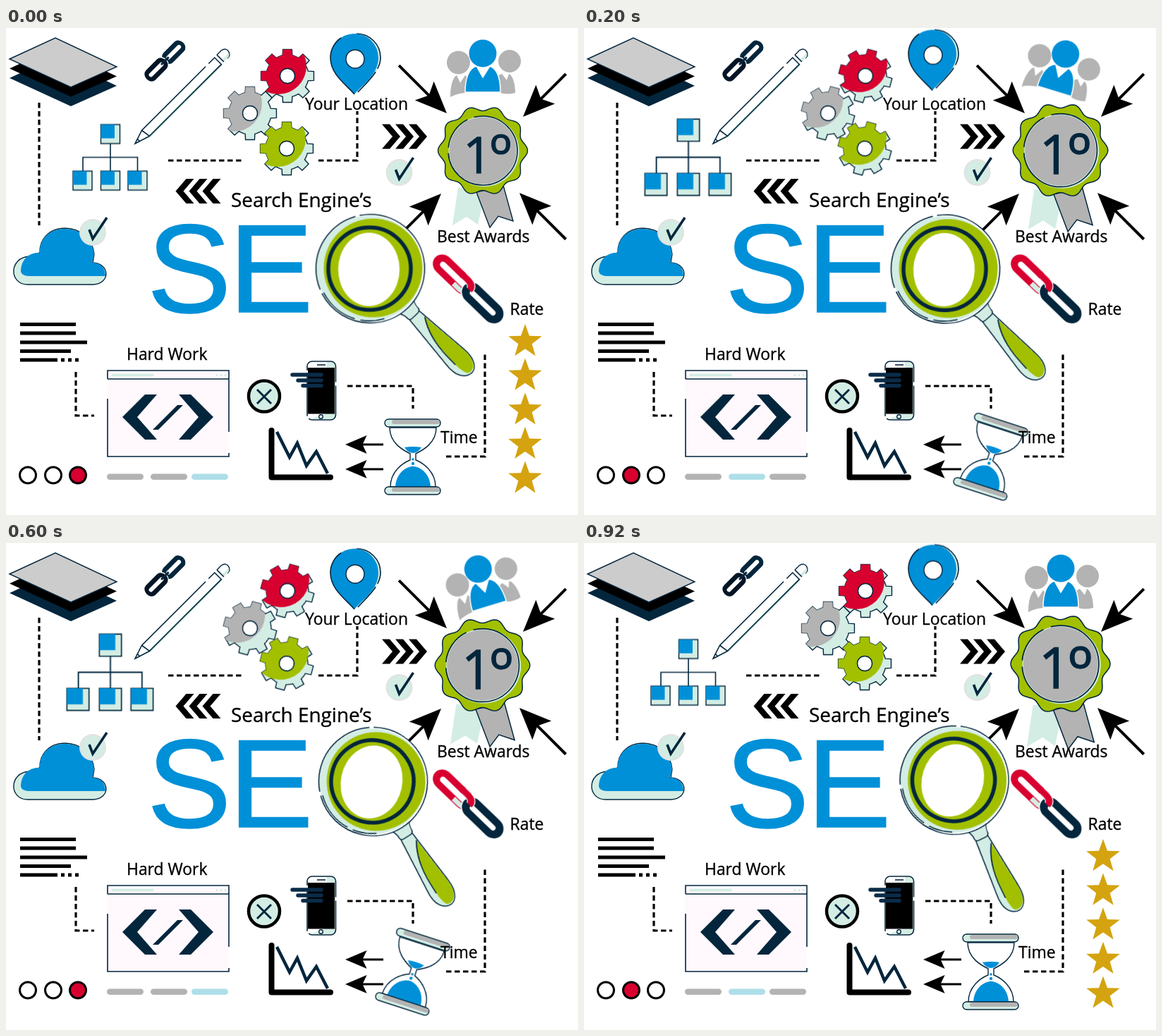
These frames come from a looping animation (811x691 px, 1000 ms). An HTML page:

```html
<!DOCTYPE html>
<html lang="en">
<head>
<meta charset="utf-8">
<title>SEO infographic</title>
<style>
  html, body { margin: 0; width: 100%; height: 100%; overflow: hidden; background: #fff; }
  svg { display: block; width: 100%; height: 100%; }
  .blue { fill: #0090d8; } .navy { fill: #03263d; } .mint { fill: #d3ede4; } .lime { fill: #a2c000; }
  .gray { fill: #b3b3b3; } .red { fill: #d8002f; } .white { fill: #fff; } .gold { fill: #d4a30f; }
  .line { fill: none; stroke: #03263d; stroke-width: 1.6; }
  .edge { stroke: #03263d; stroke-width: 1.4; }
  .dash { fill: none; stroke: #000; stroke-width: 3.2; stroke-dasharray: 7.5 4.5; }
  .label { font: 22.9px "Open Sans", "Noto Sans", sans-serif; stroke: #000; stroke-width: .35; }
  .big { font: 179px "Liberation Sans", Arial, sans-serif; stroke: #0090d8; stroke-width: 1.5; }
  .rank { font: 72px "Open Sans", "Noto Sans", sans-serif; stroke: #03263d; stroke-width: 1.2; }
</style>
</head>
<body>
<svg viewBox="0 0 811 691">
  <defs>
    <path id="sheet" d="M5 44L70 14L157 55L92 84Z"/>
    <path id="chevron" d="M0 0H11L26 17.5L11 35H0L15 17.5Z"/>
    <path id="head" d="M0 0L-45 -19L-36 0L-45 19Z"/>
    <path id="link" d="M-16 -8H16A8 8 0 0 1 16 8H-16A8 8 0 0 1 -16 -8Z"/>
    <g id="tick">
      <circle r="19" fill="#e2e2e2"/>
      <circle r="16.500" class="mint"/>
      <path d="M-5 -4L0 9L20 -21" fill="none" stroke="#03263d" stroke-width="3.600"/>
    </g>
    <g id="node">
      <path class="mint edge" d="M-13.5 -13.5H13.5V13.5H-13.5Z"/>
      <path class="blue" d="M-13.5 -13.5H6V6H-13.5Z"/>
    </g>
  </defs>

  <!-- paper stack -->
  <use href="#sheet" y="27" class="navy"/>
  <use href="#sheet" y="13.500"/>
  <use href="#sheet" fill="#ccc" class="edge"/>

  <!-- small chain -->
  <g transform="translate(225 47) rotate(-45)" fill="none" stroke="#03263d">
    <use href="#link" transform="translate(18 0) scale(.68 .78)" stroke-width="8.500"/>
    <use href="#link" transform="translate(-17 0) scale(.68 .78)" stroke="#fff" stroke-width="12"/>
    <use href="#link" transform="translate(-17 0) scale(.68 .78)" stroke="#031526" stroke-width="8.500"/>
    <path d="M-7 0H8" stroke-width="3"/>
  </g>

  <!-- pencil -->
  <g transform="translate(183 164) rotate(-45)">
    <path class="mint" d="M0 0L22 9H166V5H22Z"/>
    <path class="line" d="M0 0L20 -6.500H148M154 -6.500H166V8M0 0L22 7H166M20 -6.500L22 7M0 0L7 -2.300V2.300Z"/>
    <path class="white edge" d="M171 -7H180Q188 -5 186 2Q184 8 178 7"/>
    <path class="mint" d="M171 3H185Q183 7 178 7H171Z"/>
    <path class="line" d="M171 -7V7"/>
  </g>

  <g class="dash">
    <path d="M47 106V280"/>
    <path d="M230 188H338"/>
    <path d="M443 188H498V118"/>
    <path d="M99 488V550H125"/>
    <path d="M484 508H577V540"/>
    <path d="M624 608H679V459"/>
  </g>

  <!-- site tree -->
  <g id="tree">
    <path class="line" d="M0 -19V20M-39 20V0H38.500V20"/>
    <use href="#node" y="-33"/>
    <use href="#node" x="-39.500" y="33"/>
    <use href="#node" y="33"/>
    <use href="#node" x="38.500" y="33"/>
  </g>

  <g id="gears"></g>

  <!-- map pin -->
  <g id="pin">
    <path class="mint" d="M498 92C511 78 531 64 531 42A34 34 0 0 0 497 8Z"/>
    <path class="line" d="M497 8A34 34 0 0 1 531 42C531 60 514 75 499 91" stroke-dasharray="70 5 60"/>
    <path class="blue" d="M494 94C482 80 460 66 460 42A34 34 0 0 1 528 42C528 66 506 80 494 94Z"/>
    <path class="line" d="M494 94C482 80 460 66 460 42A34 34 0 0 1 475 14"/>
    <circle class="white edge" cx="495" cy="44" r="13"/>
  </g>
  <path id="pinTop" class="white" d="M450 0H540V26H450Z"/>

  <g id="chevrons"></g>
  <use href="#tick" x="557.500" y="205"/>

  <!-- cloud -->
  <path class="mint edge" d="M30 364C4 363 4 326 33 324Q40 320 48 319C47 300 61 284 83 284C106 284 123 300 125 321L123 333C147 334 149 362 124 364Z"/>
  <path class="blue" d="M21 346C21 328 33 318 48 319C47 300 61 285 83 285C106 285 123 300 125 321L122 333C135 333 141 341 141 352H34Q23 352 21 346Z"/>
  <use href="#tick" x="123" y="290"/>

  <!-- text lines -->
  <g stroke="#000" stroke-width="5">
    <path d="M20 420.500H99M20 433H99M20 446H115M20 458.500H92M20 471H73"/>
    <path d="M78 471H83M88 471H93M98 471H103"/>
  </g>

  <!-- code window -->
  <path fill="#fff9fe" d="M143 486H316V608H143Z"/>
  <path class="line" d="M144 498V486H316V573M144 498H316M316 603V608H144V526"/>
  <path d="M151 492.500H208" stroke="#d3ede4" stroke-width="3.500" stroke-linecap="round"/>
  <g class="mint"><circle cx="299" cy="492.500" r="1.600"/><circle cx="305" cy="492.500" r="1.600"/><circle cx="311" cy="492.500" r="1.600"/></g>
  <path class="navy" d="M165 552L197 520H214L186 552L214 584H197ZM294 552L262 520H245L273 552L245 584H262ZM208 570L243 535H251L216 570Z"/>

  <g id="dots"></g>
  <g id="bars"></g>

  <!-- close button -->
  <circle class="mint" cx="366" cy="522.500" r="22" stroke="#000" stroke-width="4.500"/>
  <path class="line" d="M356 513L376 533M376 513L356 533" style="stroke-width:3"/>

  <!-- phone -->
  <rect class="white" x="427" y="473" width="40" height="82.500" rx="7"/>
  <path class="mint" d="M455 474H461Q467 474 467 481V548Q467 555 460 555H432L455 546Z"/>
  <rect class="line" x="427" y="473" width="40.500" height="83" rx="7" stroke-dasharray="60 5 84 4"/>
  <path d="M428 482H466V547.500H428Z"/>
  <path class="line" d="M441 478H453"/>
  <circle class="white edge" cx="446.500" cy="551.500" r="2.800"/>
  <path d="M406 492H447M414 500H447M421 507.500H447" stroke="#0b2c49" stroke-width="5.400" stroke-linecap="round"/>

  <!-- falling chart -->
  <path d="M376.500 571V637.500H460" fill="none" stroke="#000" stroke-width="8" stroke-linecap="round" stroke-linejoin="round"/>
  <path class="line" d="M384 573L402 609L413 589L426 621L440 601L456 632" style="stroke-width:4.500"/>

  <g id="arrows"></g>

  <!-- team -->
  <g id="team"><g transform="translate(-676 -59)">
    <g class="gray">
      <circle cx="641.500" cy="49" r="16.500"/>
      <circle cx="714" cy="47" r="16"/>
      <path d="M630 98C630 80 634 70 639 67L644 78L651 67L658 75L651 92Q639 93 630 98Z"/>
      <path d="M697 68L703 65L710 74L713 65C719 68 722 80 722 92Q710 95 701 92Z"/>
    </g>
    <path class="blue" d="M651 91C651 72 656 57 667 54L676 70L686 54C697 58 701 73 701 91Z" stroke="#fff" stroke-width="1.500"/>
    <circle class="blue" cx="676" cy="36" r="19.500"/>
  </g></g>

  <!-- award -->
  <g id="award">
    <path class="mint" d="M-35 52L-43 106L-23 94L-7 105L3 59Z"/>
    <path class="gray edge" d="M-9 59L10 109L22 93L43 100L29 49Z"/>
    <path id="seal" class="lime edge"/>
    <circle class="mint" cx="1.500" cy="1" r="50"/>
    <circle class="gray" r="47.500"/>
    <circle class="line" r="49" stroke-dasharray="150 8 50 10 90"/>
    <g class="navy rank"><text x="-28" y="31.500">1</text><text x="10" y="37" font-size="83">º</text></g>
  </g>

  <text class="big blue" x="200 316" y="403">SE</text>

  <!-- magnifier -->
  <g id="lens">
    <g transform="rotate(46)">
      <path class="mint edge" d="M88 -8L172 -16C200 -19 208 -7 206 2C203 14 190 19 172 17L88 10Z"/>
      <path class="lime" d="M103 -8L172 -15C199 -18 207 -6 203 3C197 8 183 8 166 8Q128 8 103 -8Z"/>
      <path class="line" d="M103 -8Q128 8 166 8H182"/>
      <path class="mint edge" d="M74 -14Q80 -10 88 -10Q92 -9 92 -4V6Q92 11 88 11Q80 11 74 15Z"/>
    </g>
    <circle class="white" r="77"/>
    <circle class="mint" cx="-1" r="75"/>
    <circle class="lime" cx="4" cy="-1" r="70"/>
    <circle class="line" r="77" stroke-dasharray="205 6 130 6"/>
    <path class="line" d="M-66 34A74 74 0 0 0 -22 71M-14 73A74 74 0 0 0 20 71"/>
    <circle class="line" cx="-1" r="58.500" style="stroke-width:5.500"/>
    <ellipse class="white" cx="-2" cy="1" rx="43.500" ry="52"/>
  </g>

  <!-- large chain -->
  <g transform="translate(655 370) rotate(44)" fill="none">
    <use href="#link" transform="translate(-29 0) scale(1.250 1.120)" stroke="#d8002f" stroke-width="8.500"/>
    <path d="M-20 9H-8Q1 8 1 0" stroke="#d3ede4" stroke-width="7"/>
    <use href="#link" transform="translate(29 0) scale(1.250 1.120)" stroke="#fff" stroke-width="12"/>
    <use href="#link" transform="translate(29 0) scale(1.250 1.120)" stroke="#03263d" stroke-width="9.500"/>
    <path d="M-17 -9H-8Q3 -8 3 0" stroke="#fff" stroke-width="11.500"/>
    <path d="M-22 -9H-8Q3 -8 3 0" stroke="#d8002f" stroke-width="9"/>
  </g>

  <!-- hourglass -->
  <g id="glass">
    <path class="white edge" d="M-33 -42C-33 -20 -14 -10 -4 -5V4C-14 8 -32 20 -32 42H32C32 20 14 8 4 4V-5C14 -10 33 -20 33 -42Z"/>
    <path class="blue" d="M-25 42C-24 22 -9 13 0 13S24 22 25 42Z"/>
    <path class="blue" d="M-12 -14Q0 -16 12 -14Q7 -6 0 -6T-12 -14Z"/>
    <circle class="blue" cy="3" r="1.800"/><circle class="blue" cy="9" r="2.200"/>
    <g id="caps"></g>
  </g>

  <g id="stars" class="gold"></g>

  <g class="label">
    <text x="424" y="116">Your Location</text>
    <text x="319" y="254" style="font-size:27.900px">Search Engine’s</text>
    <text x="611" y="304">Best Awards</text>
    <text x="714.500" y="407">Rate</text>
    <text x="616" y="589">Time</text>
    <text x="171" y="470.500">Hard Work</text>
  </g>
</svg>
<script>
const $ = id => document.getElementById(id);
const fill = (id, list) => { $(id).innerHTML = list.join(''); };
const range = n => [...Array(n).keys()];

// Closed path through polar points
const polar = (n, radius, phase = 0) => 'M' + range(n).map(i => {
  const a = i / n * 2 * Math.PI + phase, r = radius(i, a);
  return (r * Math.cos(a)).toFixed(2) + ' ' + (r * Math.sin(a)).toFixed(2);
}).join('L') + 'Z';

function gearPath(teeth = 8) {
  const offsets = [[-.31, 30], [-.23, 30], [-.17, 38], [.17, 38], [.23, 30], [.31, 30]];
  const points = range(teeth).flatMap(i => offsets.map(([d, r]) => {
    const a = i * 2 * Math.PI / teeth + d;
    return (r * Math.cos(a)).toFixed(2) + ' ' + (r * Math.sin(a)).toFixed(2);
  }));
  return 'M' + points.join('L') + 'Z';
}

const gears = [[399, 68, 'red', -13], [346, 121, 'gray', -23], [398, 171, 'lime', -13]];
fill('gears', [`<clipPath id="gearClip"><path d="${gearPath()}"/></clipPath>`,
  ...gears.map(([x, y, color, shift]) => `<g transform="translate(${x} ${y})"><g class="gear">
    <path class="mint edge" d="${gearPath()}"/>
    <g clip-path="url(#gearClip)"><circle class="${color}" cx="${shift}" cy="-14" r="40"/></g>
    <circle class="white edge" r="10.5"/></g></g>`)]);

fill('chevrons', range(3).flatMap(i => [
  `<use href="#chevron" x="${533 + i * 19}" y="136.5"/>`,
  `<use href="#chevron" transform="translate(${304.5 - i * 19} 214) scale(-1 1)"/>`]));

const arrow = (x, y, angle, length, size, width) =>
  `<g transform="translate(${x} ${y}) rotate(${angle})">
    <path d="M${-length} 0H-20" stroke="#000" stroke-width="${width}"/>
    <use href="#head" transform="scale(${size})"/></g>`;
fill('arrows', [
  arrow(625, 121, 45, 96, 1, 4), arrow(733, 126, 135, 86, 1, 4),
  arrow(728, 234, 225, 93, 1, 4), arrow(617, 235, -45, 84, 1, 4),
  arrow(481, 591, 180, 54, .68, 3), arrow(481, 626, 180, 54, .68, 3)]);

fill('dots', [31, 67, 102].map(x =>
  `<circle class="white" cx="${x}" cy="634.5" r="11.5" stroke="#000" stroke-width="3"/>`));
fill('bars', [143, 205, 263].map(x =>
  `<rect class="gray" x="${x}" y="632.5" width="52" height="8.5" rx="4.2"/>`));
fill('caps', [-54, 42].map(y =>
  `<rect class="mint edge" x="-40" y="${y}" width="79" height="11" rx="5.5"/>
   <rect class="gray" x="-30" y="${y + 1}" width="68" height="6" rx="3"/>`));
fill('stars', range(5).map(i =>
  `<path transform="translate(736 ${445 + i * 48.6})" d="${polar(10, k => k % 2 ? 10.2 : 25, -Math.PI / 2)}"/>`));
$('seal').setAttribute('d', polar(144, (i, a) => 60 + 3.5 * Math.cos(10 * a)));

// Five held poses per one-second loop
function play(node, prop, poses) {
  const steps = poses.map((value, i) => ({ [prop]: value, offset: i / 5, easing: 'steps(1, end)' }));
  steps.push({ [prop]: poses[0], offset: 1 });
  node.animate(steps, { duration: 1000, iterations: Infinity }).startTime = 0;
}
const place = (x, y, turn = 0, size = 1) =>
  `translate(${x}px, ${y}px) rotate(${turn}deg) scale(${size})`;
const move = (id, poses) => play($(id), 'transform', poses.map(p => place(...p)));

move('tree', [1, 1.165, 1, 1.165, 1].map(s => [148, 183.5, 0, s]));
move('team', [0, 17, 0, -17, 0].map(a => [676, 59, a]));
move('glass', [0, 18, 0, 18, 0].map(a => [577, 609, a]));
move('pin', [0, -5.5, 13, 0, -5.5].map(y => [0, y]));
move('award', [[676, 174], [675.5, 173.5, 0, 1.06], [675.5, 171.5, 0, 1.11],
  [675.5, 173.5, 0, 1.06], [675.5, 171.5, 0, 1.11]]);
move('lens', [[516.5, 341.5], [512.5, 342, 2.4], [515.5, 340, 6.5], [520.5, 338.5, 12], [525, 336.5, 18]]);

for (const gear of document.querySelectorAll('.gear'))
  play(gear, 'transform', [0, 15, 15, 15, 0].map(a => `rotate(${a}deg)`));

play($('stars'), 'visibility', ['visible', 'hidden', 'visible', 'hidden', 'visible']);
play($('pinTop'), 'visibility', ['hidden', 'hidden', 'visible', 'hidden', 'hidden']);

const lit = [2, 1, 0, 2, 1];
const light = (id, on, off) => [...$(id).children].forEach((el, i) =>
  play(el, 'fill', lit.map(k => k === i ? on : off)));
light('dots', '#d8002f', '#fff');
light('bars', '#aedfe9', '#b3b3b3');
</script>
</body>
</html>
```
